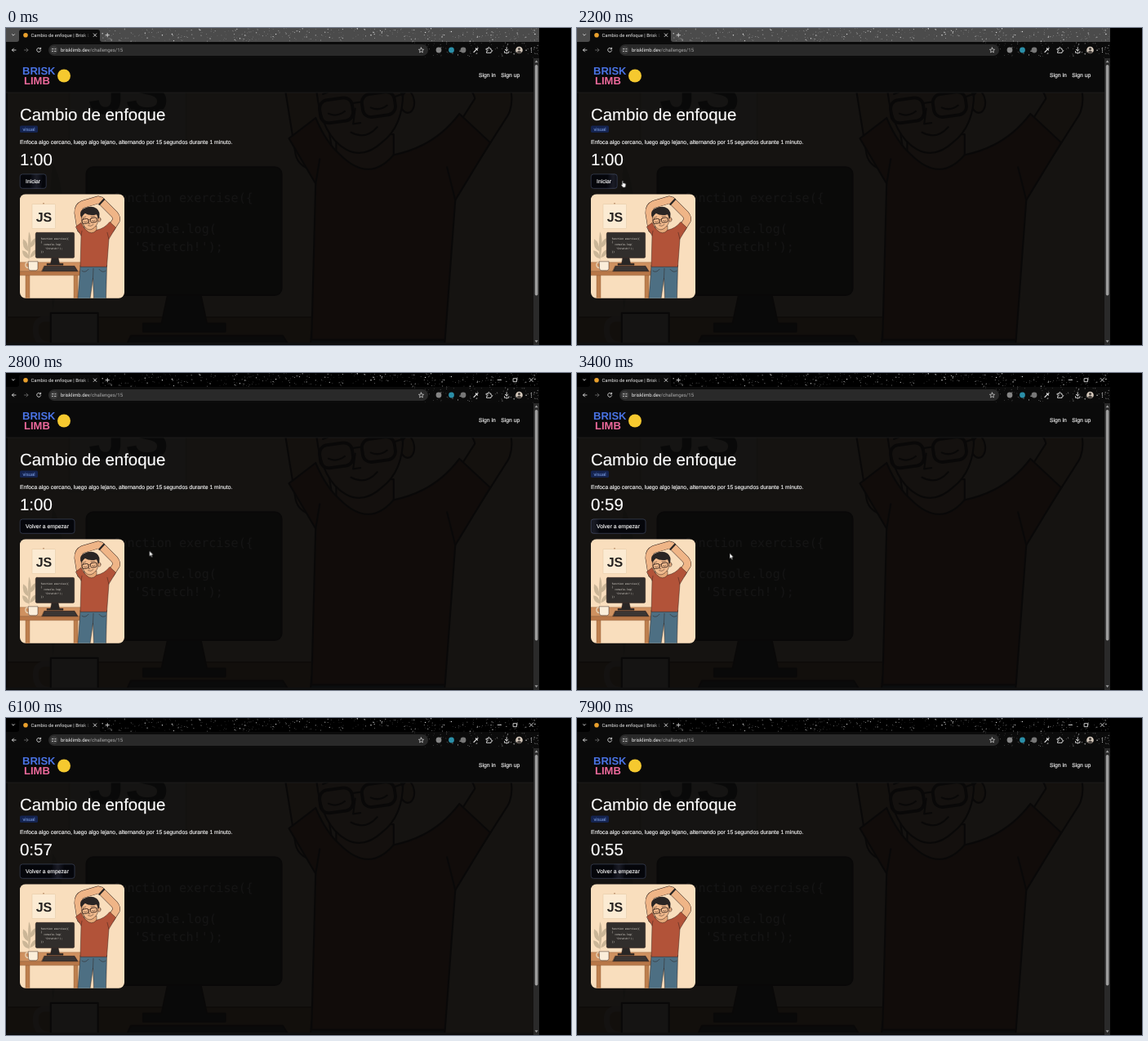
Write an HTML page that moves like this. It is 692 px wide and 388 px high and loops after 8 s.

```html
<!DOCTYPE html>
<html lang="es">
<head>
<meta charset="utf-8">
<title>Cambio de enfoque</title>
<style>
  html, body { margin: 0; width: 100%; height: 100%; overflow: hidden; background: #000; }
  svg { display: block; }
  text { font-family: "Liberation Sans", Arial, sans-serif; text-rendering: geometricPrecision; white-space: pre; }
  .ui { font-family: Roboto, sans-serif; font-size: 6px; }
  .code text { font-family: "DejaVu Sans Mono", monospace; font-size: 3px; fill: #f4efe6; }
  .body { font-size: 6.81px; fill: #f1f1f1; stroke: #f1f1f1; stroke-width: .14; }
  .big { font-size: 20.43px; fill: #fff; stroke: #fff; stroke-width: .15; }
  .ink { stroke: #2b1a16; stroke-width: .45; stroke-linejoin: round; stroke-linecap: round; }
  .wood { stroke: #8a5836; stroke-width: .4; stroke-linejoin: round; }
  .icon { fill: none; stroke: #dcdcdc; stroke-width: .9; stroke-linecap: round; stroke-linejoin: round; }

  .unfocused, .focused, .before, .after, .cursor, .arrow, .hand, .count {
    animation: 8s step-end infinite;
  }
  .unfocused { animation-name: hide-on-focus; }
  .focused { animation-name: show-on-focus; }
  .before { animation-name: hide-on-click; }
  .after { animation-name: show-on-click; }
  .count { animation-name: count; }
  .hand { animation-name: hand; }
  .arrow { animation-name: arrow; }
  .cursor { animation-name: cursor-seen; }
  .path { animation: cursor-path 8s linear infinite; }
  .shine { animation: shine 2s -.8s linear infinite; }

  @keyframes hide-on-focus { 0% { visibility: visible } 28.1%, 100% { visibility: hidden } }
  @keyframes show-on-focus { 0% { visibility: hidden } 28.1%, 100% { visibility: visible } }
  @keyframes hide-on-click { 0% { visibility: visible } 29.375%, 100% { visibility: hidden } }
  @keyframes show-on-click { 0% { visibility: hidden } 29.375%, 100% { visibility: visible } }
  @keyframes count {
    0% { transform: none }
    41.875% { transform: translateY(-30px) }
    54.375% { transform: translateY(-60px) }
    66.875% { transform: translateY(-90px) }
    79.375% { transform: translateY(-120px) }
    91.875%, 100% { transform: translateY(-150px) }
  }
  @keyframes cursor-seen {
    0% { visibility: hidden } 24.5% { visibility: visible }
    73.2%, 100% { visibility: hidden }
  }
  @keyframes hand { 0% { opacity: 0 } 27% { opacity: 1 } 32%, 100% { opacity: 0 } }
  @keyframes arrow { 0% { opacity: 1 } 27% { opacity: 0 } 32%, 100% { opacity: 1 } }
  @keyframes cursor-path {
    0%, 25% { transform: translate(305px, 251px); animation-timing-function: ease-out }
    28%, 31% { transform: translate(44px, 184px); animation-timing-function: ease-in-out }
    36%, 69% { transform: translate(187px, 220.5px); animation-timing-function: ease-in }
    73%, 100% { transform: translate(613px, 298px) }
  }
  @keyframes shine {
    0% { transform: translateX(-18px) }
    70%, 100% { transform: translateX(var(--w)) }
  }
</style>
</head>
<body>
<svg width="692" height="388" viewBox="0 0 692 388">
  <defs>
    <linearGradient id="glow">
      <stop offset="0" stop-color="#aab4ff" stop-opacity="0"/>
      <stop offset=".5" stop-color="#c4c8f4" stop-opacity=".12"/>
      <stop offset="1" stop-color="#aab4ff" stop-opacity="0"/>
    </linearGradient>
    <linearGradient id="tabFade" gradientUnits="userSpaceOnUse" x1="94" x2="102.5">
      <stop stop-color="#e6e6e6"/><stop offset="1" stop-color="#e6e6e6" stop-opacity="0"/>
    </linearGradient>
    <clipPath id="page"><rect y="79" width="646" height="306"/></clipPath>
    <clipPath id="card"><rect width="128" height="127.5" rx="7"/></clipPath>
    <clipPath id="clock"><rect x="16" y="150" width="60" height="24"/></clipPath>
    <clipPath id="shortBtn"><rect x="17" y="178.7" width="32.4" height="17.8" rx="3.2"/></clipPath>
    <clipPath id="longBtn"><rect x="17" y="178.7" width="67.2" height="17.8" rx="3.2"/></clipPath>

    <g id="scene">
      <rect width="128" height="128" fill="#f9debd"/>
      <!-- poster -->
      <rect x="15" y="12.5" width="28.5" height="29.5" fill="#fcebd3" stroke="#dcc09c" stroke-width=".4"/>
      <circle cx="29" cy="11.5" r=".8" fill="#a97a54"/>
      <text x="19.7" y="34" font-size="16" font-weight="bold" fill="#262321">JS</text>
      <!-- plant -->
      <path d="M11 82Q9 62 11 46Q16 54 11 82M10 70Q2 66 4 55Q11 59 10 70M12 66Q13 56 19 54Q20 63 12 66M11 79Q3 78 3 69Q11 70 11 79M12 78Q14 69 20 68Q20 76 12 78" fill="#cbb697"/>
      <!-- desk -->
      <g class="wood">
        <path d="M7 98H12V128H7ZM66 98H71V128H66Z" fill="#bd7f4e"/>
        <path d="M0 83.5H80V94.5H0Z" fill="#cf9160"/>
        <path d="M0 94.5H80V99.5H0Z" fill="#b87748"/>
      </g>
      <!-- monitor -->
      <path d="M39 78H47L48.5 85H53V87H33V85H37.5Z" fill="#292625" class="ink"/>
      <rect x="19.2" y="47" width="47.5" height="31.1" rx="1.6" fill="#312e2c" class="ink"/>
      <g class="code">
        <text x="25.5" y="55.4">function exercise({</text>
        <text x="25.5" y="59.3">{</text>
        <text x="29.2" y="63.1">console.log(</text>
        <text x="30.8" y="67.3">'Stretch!');</text>
        <text x="25.5" y="71.7">})</text>
      </g>
      <path d="M30 88H67L71 94.5H27Z" fill="#35302f" class="ink"/>
      <path d="M31 90H67M30 92H68" stroke="#5a4f4b" stroke-width=".4"/>
      <path d="M11 84Q6 83 7 88Q8 91 12 90" fill="none" stroke="#e7cfb0" stroke-width="1.4"/>
      <path d="M10.5 82.5H22V91Q22 93.5 19.5 93.5H13Q10.5 93.5 10.5 91Z" fill="#fbeeda" class="ink"/>
      <!-- person -->
      <path d="M71 128L74 87H106.5L105.5 128H90.5L89.5 103L86 128Z" fill="#4d6f83" class="ink"/>
      <path d="M89.5 103L90 91M76 94Q80 97 84 92M97 92Q101 97 105 94" fill="none" class="ink"/>
      <g fill="none" stroke-linecap="round" stroke-linejoin="round">
        <g stroke="#2b1a16" stroke-width="9.4">
          <path d="M111 43L118 32Q119 29 116 25L99 8"/>
          <path d="M74.5 43L71.3 23Q71 15 77 12.5L96 7"/>
        </g>
        <g stroke="#efb587" stroke-width="8.5">
          <path d="M111 43L118 32Q119 29 116 25L99 8"/>
          <path d="M74.5 43L71.3 23Q71 15 77 12.5L96 7"/>
        </g>
        <path d="M97.5 12.5L103 6.5" stroke="#2c2826" stroke-width="2.3"/>
      </g>
      <path d="M80 39H94V47Q87 53 80 46Z" fill="#e5a878" class="ink"/>
      <path d="M68.5 40L75 35Q77.5 41 81 44Q88 51 94 44Q104 42 110 34L117.5 41L109 55L106.5 89H74L75 51Z" fill="#b25339" class="ink"/>
      <path d="M75 51L76 45M109 55L107 47" fill="none" class="ink"/>
      <g transform="translate(-1 -.6) rotate(-8 88 33)">
        <ellipse cx="98.3" cy="33" rx="1.8" ry="2.8" fill="#efb587" class="ink"/>
        <path d="M77 25Q76 38 82 42.5Q86 45.5 91 42Q98 38 98 26Q88 19 77 25Z" fill="#f1ba8d" class="ink"/>
        <path d="M77 28Q74 21 81 17.5Q91 14 97 19.5Q101 24 98.7 30.5L97.3 32L96 26.5Q87 27.5 82 23Q79 25 77 28Z" fill="#2a2524"/>
        <g fill="none" class="ink">
          <rect x="77" y="30" width="8" height="5.6" rx="2" stroke-width=".8"/>
          <rect x="87.4" y="30" width="8" height="5.6" rx="2" stroke-width=".8"/>
          <path d="M85 31.6H87.4M95.4 31.5L98 31M79 33.3Q81 34.5 83 33.3M89.4 33.3Q91.4 34.5 93.4 33.3M85.6 33L84.6 36.6H86.4M83.8 38.6Q87 41 90.3 38.2M78.3 28.4L82.4 27.5M88.8 27.8L93 28.3"/>
        </g>
      </g>
    </g>
  </defs>

  <!-- browser frame -->
  <rect width="692" height="388"/>
  <rect class="unfocused" width="653" height="17" fill="#4b4b4b"/>
  <rect y="17" width="653" height="20" fill="#0b0b0b"/>
  <g id="stars" fill="#fff"></g>
  <path d="M13 17Q16 17 16 14V5Q16 2 19 2H112Q115 2 115 5V14Q115 17 118 17Z" fill="#0b0b0b"/>
  <circle cx="24" cy="8.7" r="2.8" fill="#eaa02c"/>
  <text class="ui" x="30.5" y="10.8" fill="url(#tabFade)" style="font-size:5.8px">Cambio de enfoque | Brisk Limb</text>
  <g class="icon">
    <path d="M7.5 7.7L9 9.2L10.5 7.7M107.2 6.9L110.8 10.5M110.8 6.9L107.2 10.5M122 8.7H126.4M124.2 6.5V10.9"/>
    <path class="focused" d="M602.5 8.5H606.5M621.5 6.7H625.5V10.7H621.5ZM641.3 6.5L645.3 10.5M645.3 6.5L641.3 10.5"/>
    <path d="M12 27H7.5M9.5 25L7.5 27L9.5 29"/>
    <path d="M22.5 27H27M25 25L27 27L25 29" stroke="#666"/>
    <path d="M42.2 25.3A2.5 2.5 0 1 0 42.6 27.7M42.6 24.2V25.9H40.9"/>
  </g>
  <rect x="52" y="20" width="465" height="14" rx="7" fill="#292929"/>
  <circle cx="58.7" cy="27" r="4.8" fill="#3b3b3b"/>
  <path class="icon" d="M56.5 25.7H58M60 25.7H61M56.5 28.4H57.5M59.5 28.4H61"/>
  <text class="ui" x="67" y="29.2" fill="#f1f1f1">brisklimb.dev<tspan fill="#aaa">/challenges/15</tspan></text>
  <path class="icon" d="M508.5 24L509.4 26.1L511.6 26.3L509.9 27.8L510.4 30L508.5 28.8L506.6 30L507.1 27.8L505.4 26.3L507.6 26.1Z" style="stroke-width:.7"/>
  <circle cx="530" cy="27" r="3.4" fill="#858585"/>
  <circle cx="545.5" cy="27" r="3.4" fill="#2b8fa8"/>
  <circle cx="560" cy="27" r="3.4" fill="#777"/>
  <g class="icon">
    <path d="M573 29.5L576.2 26.2M575.4 25L577.4 27M576.6 25.8L578 24.4" stroke-width="1.2"/>
    <path d="M588.5 25.2H590.4Q590.4 23.4 591.4 23.4Q592.4 23.4 592.4 25.2H594V27Q595.6 27 595.6 28Q595.6 29 594 29V30.4H588.5V28.8Q590 28.8 590 27.8Q590 26.8 588.5 26.8Z"/>
    <path d="M613.2 23.6V28M611.3 26.3L613.2 28.2L615.1 26.3M610.5 28.6V30.3H615.9V28.6"/>
  </g>
  <circle cx="628.5" cy="27" r="4.3" fill="#d6cabd"/>
  <path d="M625.4 29.8Q628.5 25.8 631.6 29.8Q628.5 32.2 625.4 29.8Z" fill="#4b4541"/>
  <circle cx="628.5" cy="25.7" r="1.6" fill="#4b4541"/>
  <path d="M643.5 24.7V24.71M643.5 27V27.01M643.5 29.3V29.31" class="icon" style="stroke-width:1.3"/>

  <!-- page -->
  <rect y="37" width="646" height="351" fill="#080808"/>
  <g clip-path="url(#page)">
    <use href="#scene" transform="translate(2 -66) scale(5.03)" opacity=".05"/>
  </g>
  <rect y="37" width="646" height="42" fill="#0a0a0a"/>
  <path d="M0 79H646M0 386H646" stroke="#242424" stroke-width=".6"/>
  <g font-weight="bold" font-size="13">
    <text x="20" y="57" fill="#4a74e6">BRISK</text>
    <text x="22" y="69.3" fill="#ee6a9c">LIMB</text>
  </g>
  <circle cx="71" cy="58.5" r="8" fill="#f6c92f"/>
  <text class="body" x="579" y="60.3">Sign in</text>
  <text class="body" x="606.3" y="60.3">Sign up</text>

  <text class="big" x="17" y="112.7">Cambio de enfoque</text>
  <rect x="17" y="119.6" width="22" height="8.5" rx="1.7" fill="#14234f"/>
  <text x="20.4" y="126" font-size="5.96" fill="#86aaf2">visual</text>
  <text class="body" x="17" y="142.3">Enfoca algo cercano, luego algo lejano, alternando por 15 segundos durante 1 minuto.</text>
  <g clip-path="url(#clock)"><g class="count big" id="times"></g></g>

  <g class="before" style="--w:33px">
    <rect x="17.2" y="178.9" width="32" height="17.4" rx="3" fill="#05060b" stroke="#434e68" stroke-width=".6"/>
    <g clip-path="url(#shortBtn)"><path class="shine" d="M20 178H35L32 197H17Z" fill="url(#glow)"/></g>
    <text class="body" x="24" y="189.9">Iniciar</text>
  </g>
  <g class="after" style="--w:68px">
    <rect x="17.2" y="178.9" width="66.8" height="17.4" rx="3" fill="#05060b" stroke="#434e68" stroke-width=".6"/>
    <g clip-path="url(#longBtn)"><path class="shine" d="M20 178H35L32 197H17Z" fill="url(#glow)"/></g>
    <text class="body" x="24" y="189.9">Volver a empezar</text>
  </g>

  <g transform="translate(17 203.3)" clip-path="url(#card)"><use href="#scene"/></g>

  <!-- scrollbar -->
  <rect x="646" y="37" width="7" height="351" fill="#2a2a2a"/>
  <rect x="647.8" y="45" width="3.6" height="282.5" rx="1.8" fill="#9d9d9d"/>
  <path d="M647.6 42.3L649.6 39.5L651.6 42.3ZM647.6 382.3L649.6 385.1L651.6 382.3Z" fill="#9d9d9d"/>

  <!-- pointer -->
  <g class="cursor"><g class="path" stroke="#000" stroke-width=".5" fill="#fff">
    <path class="arrow" d="M0 0V7L1.6 5.6L2.7 8L3.8 7.5L2.7 5.1H4.9Z"/>
    <path class="hand" d="M.2 .6Q.9 -.4 1.5 .6V3Q2.4 2.4 2.7 3.2Q3.6 2.8 3.8 3.6Q4.9 3.4 4.8 4.5Q4.8 7 3.8 8.2H1Q-.2 6.4 -1.2 5Q-.9 4 .2 5Z"/>
  </g></g>
</svg>
<script>
  const NS = 'http://www.w3.org/2000/svg';
  const add = (parent, tag, attrs, text = '') => {
    const el = document.createElementNS(NS, tag);
    for (const key in attrs) el.setAttribute(key, attrs[key]);
    el.textContent = text;
    parent.append(el);
  };

  ['1:00', '0:59', '0:58', '0:57', '0:56', '0:55'].forEach((time, i) =>
    add(document.getElementById('times'), 'text', { x: 17, y: 168.4 + i * 30 }, time));

  let seed = 41;
  const random = () => (seed = seed * 16807 % 2147483647) / 2147483647;
  const scatter = (count, left, top, height) => {
    for (let i = 0; i < count; i++) {
      add(document.getElementById('stars'), 'circle', {
        cx: left + random() * (652 - left),
        cy: top + random() * height,
        r: .3 + random() ** 3 * .45,
        opacity: .3 + random() * .6
      });
    }
  };
  scatter(420, 118, .5, 16);
  scatter(110, 480, 17, 19);
</script>
</body>
</html>
```
